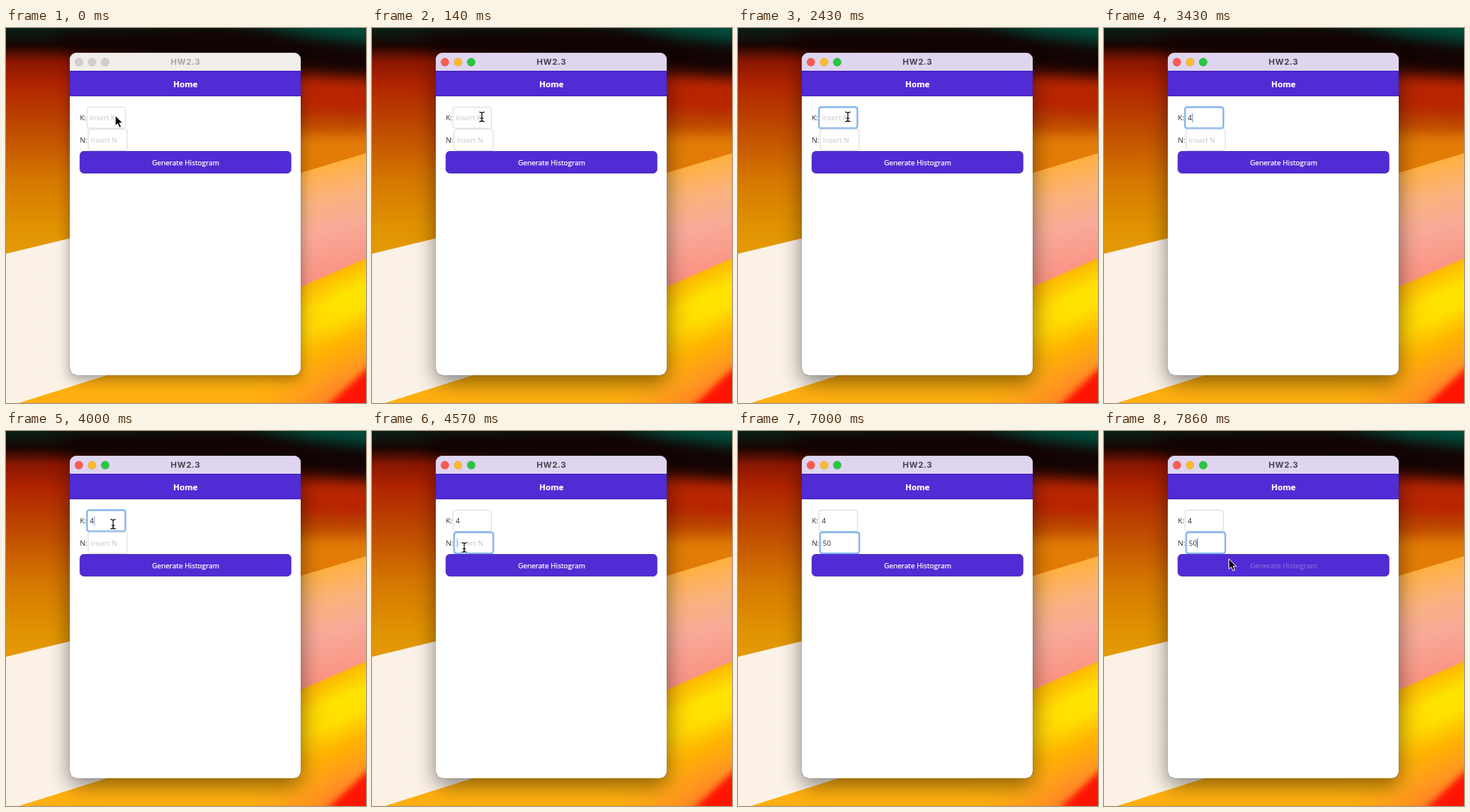
Animation of 480x500 px, one loop 8 s. Source, as an HTML page:

```html
<!DOCTYPE html>
<html lang="en">
<head>
<meta charset="utf-8">
<title>Histogram form</title>
<style>
  html, body { margin: 0; width: 100%; height: 100%; overflow: hidden; }
  svg { display: block; width: 480px; height: 500px; }
  text { font: 9.5px "Open Sans", sans-serif; fill: #2b2b2b; }
  .mid { text-anchor: middle; }
  .soft { filter: blur(9px); }
  .edge { filter: blur(4px); }
  #title { font: 700 11px Inter, sans-serif; letter-spacing: .5px; }
  #home { font-weight: 700; font-size: 11px; fill: #fff; stroke: #fff; stroke-width: .2px; }
  #button { stroke-width: .25px; }
  .field { fill: #fff; stroke: #dadada; }
  .focus { stroke: #86b6f0; stroke-width: 2.3; }
</style>
</head>
<body>
<svg viewBox="0 0 480 500">
  <defs>
    <linearGradient id="base" x2="0" y2="1">
      <stop offset="0" stop-color="#0a2018"/>
      <stop offset=".045" stop-color="#180603"/>
      <stop offset=".09" stop-color="#8a1600"/>
      <stop offset=".15" stop-color="#b02400"/>
      <stop offset=".25" stop-color="#bc4400"/>
      <stop offset=".4" stop-color="#d47600"/>
      <stop offset=".53" stop-color="#e09200"/>
      <stop offset=".6" stop-color="#e49a06"/>
    </linearGradient>
    <linearGradient id="cream" x2="1">
      <stop offset="0" stop-color="#fbf1e6"/>
      <stop offset="1" stop-color="#fdf6ee"/>
    </linearGradient>
    <linearGradient id="pink" gradientUnits="userSpaceOnUse" x1="420" y1="184" x2="455" y2="322">
      <stop offset="0" stop-color="#ffb040"/>
      <stop offset=".3" stop-color="#fab27c"/>
      <stop offset=".6" stop-color="#f8aa98"/>
      <stop offset="1" stop-color="#fa9484"/>
    </linearGradient>
    <linearGradient id="yellow" gradientUnits="userSpaceOnUse" x1="440" y1="325" x2="500" y2="462">
      <stop offset="0" stop-color="#fbb800"/>
      <stop offset=".22" stop-color="#ffe400"/>
      <stop offset=".38" stop-color="#ffe000"/>
      <stop offset=".6" stop-color="#ffb400"/>
      <stop offset=".85" stop-color="#ff9820"/>
      <stop offset="1" stop-color="#ff8424"/>
    </linearGradient>
    <linearGradient id="amber" gradientUnits="userSpaceOnUse" x1="310" x2="440">
      <stop offset="0" stop-color="#ffb010"/>
      <stop offset="1" stop-color="#ffb010" stop-opacity="0"/>
    </linearGradient>
    <clipPath id="frame"><rect x="85" y="33" width="308" height="430" rx="9"/></clipPath>
  </defs>

  <rect width="480" height="500" fill="url(#base)"/>
  <g class="soft">
    <path d="M370 76L500 80V112L370 108Z" fill="#b82400"/>
    <path d="M370 142L500 142V230H370Z" fill="#e27c06"/>
    <path d="M60 8L500 -10V66L380 58L85 30Z" fill="#120403"/>
    <path d="M250 -20H500V22L400 10Z" fill="#004c3c"/>
  </g>
  <path d="M0 301L393 206V382L18 500H0Z" fill="url(#cream)"/>
  <path d="M300 221L480 167V310L300 386Z" fill="url(#pink)"/>
  <path id="floor" d="M18 500L300 411V386L480 307V500Z" fill="url(#yellow)"/>
  <path d="M18 500L300 411V386L480 307V500Z" fill="url(#amber)"/>
  <path class="edge" d="M424 508L490 446V508Z" fill="#ff1404"/>

  <rect id="shadow" x="85" y="33" width="308" height="430" rx="9"/>
  <g clip-path="url(#frame)">
    <rect x="85" y="33" width="308" height="430" fill="#fff"/>
    <rect id="bar" x="85" y="33" width="308" height="25"/>
    <rect x="85" y="57" width="308" height="34" fill="#512bd4"/>
    <path d="M85 57.5H393M85 90.6H393" stroke="#3f1fb4" stroke-width=".8"/>
  </g>
  <rect x="85" y="33" width="308" height="430" rx="9" fill="none" stroke="#000" stroke-opacity=".15" stroke-width=".7"/>
  <g id="lights" stroke-width=".6">
    <circle cx="97.2" cy="45.5" r="5.2"/>
    <circle cx="114.8" cy="45.5" r="5.2"/>
    <circle cx="132.2" cy="45.5" r="5.2"/>
  </g>
  <text id="title" class="mid" x="239.3" y="49">HW2.3</text>
  <text id="home" class="mid" x="239.3" y="78.5">Home</text>

  <text x="98.5" y="123.3">K:</text>
  <text x="98.5" y="153">N:</text>
  <rect id="boxK" x="108" y="105.5" width="51.2" height="28.2" rx="3"/>
  <rect id="boxN" x="109.5" y="135" width="52.2" height="28.2" rx="3"/>
  <text id="textK" x="111.8" y="123.3"></text>
  <text id="textN" x="113" y="153"></text>
  <rect id="caret" width="1.2" height="12.5" fill="#3d6fd0"/>

  <rect x="98.7" y="164.5" width="281.3" height="29" rx="5" fill="#512bd4" stroke="#3f20b4" stroke-width=".8"/>
  <text id="button" class="mid" x="239.5" y="183">Generate Histogram</text>

  <path id="arrow" d="M0 0V13.6L3.1 10.8L5.4 16L7.9 14.9L5.6 9.9H9.8Z" fill="#000" stroke="#fff" stroke-width="1" stroke-linejoin="round"/>
  <g id="beam" fill="none" stroke-linecap="round">
    <path d="M-3 -6.3Q0 -6.3 0 -4V4Q0 6.3 -3 6.3M3 -6.3Q0 -6.3 0 -4M0 4Q0 6.3 3 6.3M-1.6 2H1.6" stroke="#fff" stroke-width="2.4"/>
    <path d="M-3 -6.3Q0 -6.3 0 -4V4Q0 6.3 -3 6.3M3 -6.3Q0 -6.3 0 -4M0 4Q0 6.3 3 6.3M-1.6 2H1.6" stroke="#111" stroke-width="1.2"/>
  </g>
</svg>
<script>
const $ = id => document.getElementById(id);
const set = (id, attrs) => {
  for (const key in attrs) $(id).setAttribute(key, attrs[key]);
};

// Last entry [step, ...values] that has been reached.
const at = (list, n) => list.filter(entry => entry[0] <= n).pop().slice(1);

const pointer = [[0, 145.8, 116.8], [1, 146.5, 118.4], [27, 146.5, 118.4], [31, 123, 155.2],
                 [50, 123, 155.2], [53, 166.5, 170.4], [56, 166.5, 170.4]];
const caretAlpha = [[0, 0], [10, .5], [11, 1], [15, .5], [16, 0], [19, .5], [20, 1],
                    [24, .7], [25, 1], [28, .5], [29, 0], [32, .5], [33, 1], [35, .5],
                    [36, 0], [38, 1], [44, .5], [45, 0], [50, .5], [51, 1]];

function pointerAt(n) {
  const i = Math.max(1, pointer.findIndex(p => p[0] >= n));
  const [a, x0, y0] = pointer[i - 1], [b, x1, y1] = pointer[i];
  const u = (n - a) / (b - a), e = u * u * (3 - 2 * u);
  return [x0 + (x1 - x0) * e, y0 + (y1 - y0) * e];
}

function showField(name, value, focused) {
  const text = $('text' + name);
  text.textContent = value || 'Insert ' + name;
  text.style.fill = value ? '#2b2b2b' : '#c6c6c6';
  set('box' + name, { class: focused ? 'field focus' : 'field' });
}

function draw(n) {
  const active = n >= 1;
  set('bar', { fill: active ? '#dfd5ef' : '#f0edea' });
  $('title').style.fill = active ? '#48434f' : '#aaa5a1';
  $('shadow').style.filter = active
    ? 'drop-shadow(0 9px 14px rgba(0,0,0,.48))'
    : 'drop-shadow(0 6px 9px rgba(0,0,0,.36))';
  const colors = active ? ['#fb5b52', '#fdbb2d', '#28c63f'] : Array(3).fill('#d3cecb');
  const edges = active ? ['#dc4840', '#dda023', '#1da531'] : Array(3).fill('#b9b4b0');
  [...$('lights').children].forEach((dot, i) => {
    dot.setAttribute('fill', colors[i]);
    dot.setAttribute('stroke', edges[i]);
  });

  const onN = n >= 32;
  const k = n >= 24 ? '4' : '';
  const num = n >= 40 ? '50' : n >= 38 ? '5' : '';
  showField('K', k, n >= 10 && !onN);
  showField('N', num, onN);
  const typed = onN ? num : k;
  set('caret', {
    x: (onN ? 112.9 : 111.9) + typed.length * 5.42,
    y: onN ? 143.3 : 113.6,
    opacity: at(caretAlpha, n)[0]
  });
  const label = n >= 55 ? '#8267dd' : '#fff';
  set('button', { style: `fill: ${label}; stroke: ${label}` });

  const [x, y] = pointerAt(n);
  const hidden = n >= 24 && n < 27 || n >= 38 && n < 50;
  const arrow = !active || y > 164;
  const transform = `translate(${x} ${y})`;
  set('arrow', { transform, visibility: !hidden && arrow ? 'visible' : 'hidden' });
  set('beam', { transform, visibility: !hidden && !arrow ? 'visible' : 'hidden' });
}

// Seven steps a second, as in a screen recording.
let last = -1;
function tick() {
  const n = Math.min(55, Math.floor(performance.now() % 8000 * .007 + .03));
  if (n !== last) draw(last = n);
  requestAnimationFrame(tick);
}
tick();
</script>
</body>
</html>
```
